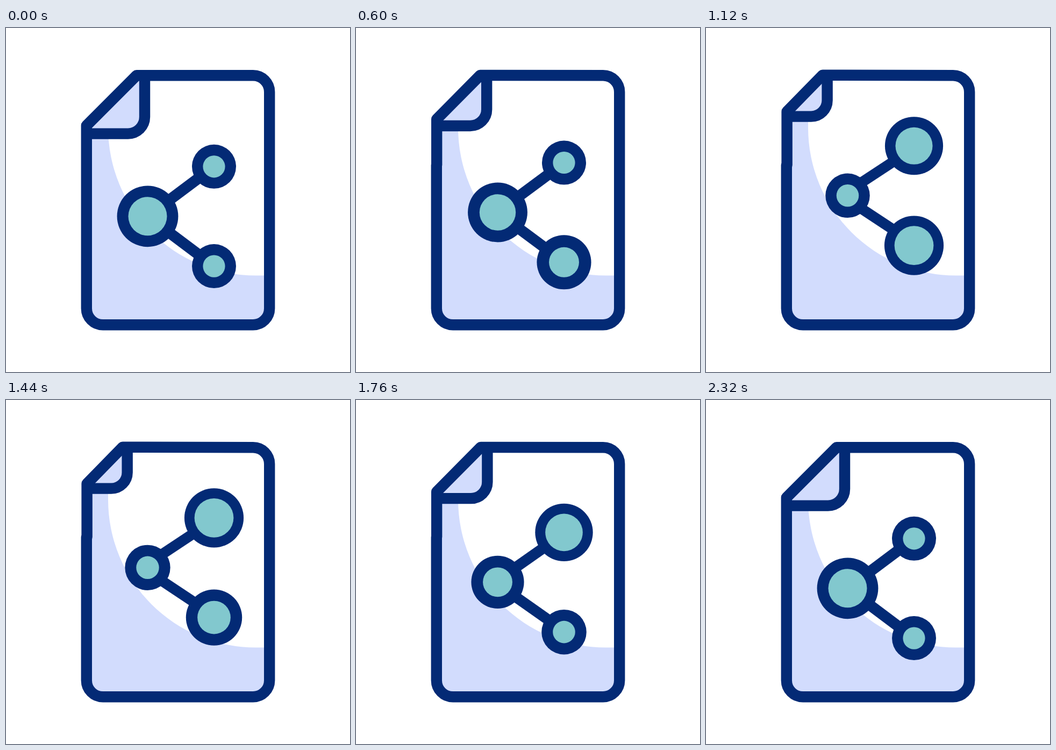
Recreate the animation shown at these times as an HTML page. Size 640x640 px, loop 2.4 s.

```html
<!DOCTYPE html>
<html lang="en">
<head>
<meta charset="utf-8">
<title>Share file icon</title>
<style>
  html, body { margin: 0; width: 100%; height: 100%; overflow: hidden; background: #fff; }
  svg { display: block; width: 100vw; height: 100vh; }
  .line { fill: none; stroke: #032a75; stroke-width: 20.4; stroke-linejoin: round; }
  .dark { fill: #032a75; }
  .teal { fill: #82c8ce; }
  .pale { fill: #d2dcfd; }
</style>
</head>
<body>
<svg viewBox="0 0 640 640">
  <path class="pale" d="M149.8 170H190V185.5A275 275 0 0 0 465 460.5H490.2V521.7A30.6 30.6 0 0 1 459.6 552.3H180.4A30.6 30.6 0 0 1 149.8 521.7Z"/>
  <path id="flap" class="pale"/>
  <path id="crease" class="line"/>
  <path id="page" class="line"/>
  <g id="share">
    <path id="links" class="line"/>
    <g id="nodes"></g>
  </g>
</svg>
<script>
const LOOP = 2400, STEP = 40;
const $ = id => document.getElementById(id);
const clamp = x => Math.min(1, Math.max(0, x));
const mix = (a, b, p) => a + (b - a) * p;
const soft = u => u * u * (3 - 2 * u);
const softer = u => u * u * u * (u * (6 * u - 15) + 10);

// Rises over [a, b] and falls back over [c, d].
function pulse(t, [a, b, c, d], ease, power = 1) {
  const up = ease(clamp((t - a) / (b - a)) ** power);
  return up - ease(clamp((t - c) / (d - c)));
}

const SMALL = [41, 20.6], BIG = [55.1, 36.4], MAIN = [56.9, 36];

const nodes = [
  { x: 263.5, y: 350.3, from: MAIN, to: SMALL,
    outer: [280, 1160, 1285, 2225], inner: [280, 1160, 1325, 2265], power: [1.65, 1.4] },
  { x: 387, y: 257.8, from: SMALL, to: BIG,
    outer: [690, 1205, 1650, 2210], inner: [715, 1230, 1650, 2210], power: [1, 1] },
  { x: 387, y: 443.1, from: SMALL, to: BIG,
    outer: [240, 820, 1275, 1840], inner: [330, 895, 1200, 1800], power: [1, 1] }
];

function circle(name, { x, y }) {
  const el = document.createElementNS("http://www.w3.org/2000/svg", "circle");
  el.setAttribute("class", name);
  el.setAttribute("cx", x);
  el.setAttribute("cy", y);
  return $("nodes").appendChild(el);
}
for (const n of nodes) {
  n.rim = circle("dark", n);
  n.core = circle("teal", n);
}

function drawPage(f) {
  const left = 149.8 + 0.8 * f, top = 88.3 - 0.6 * f;
  const tipX = 242.9 - 25.9 * f, tipY = 181.5 - 26 * f;
  const x = 258 - 32.4 * f, y = 196.6 - 32 * f, r = 31 - f;
  const curl = `V${y - r}A${r} ${r} 0 0 1 ${x - r} ${y}H${left}`;
  $("flap").setAttribute("d", `M${tipX} ${top}H${x}${curl}V${tipY}Z`);
  $("crease").setAttribute("d", `M${x} ${top}${curl}`);
  $("page").setAttribute("d",
    `M${tipX} ${top}L459.6 88.3A30.6 30.6 0 0 1 490.2 118.9V521.7` +
    `A30.6 30.6 0 0 1 459.6 552.3H180.4A30.6 30.6 0 0 1 149.8 521.7` +
    `V255H${left}V${tipY}Z`);
}

function drawShare(t) {
  const lift = -38.5 * pulse(t, [450, 920, 1445, 1960], softer);
  $("share").setAttribute("transform", `translate(0 ${lift})`);
  for (const n of nodes) {
    const outer = pulse(t, n.outer, soft, n.power[0]);
    const inner = pulse(t, n.inner, soft, n.power[1]);
    n.rim.setAttribute("r", mix(n.from[0], n.to[0], outer));
    n.core.setAttribute("r", mix(n.from[1], n.to[1], inner));
  }
  const [main, up, down] = nodes;
  const q = pulse(t, main.outer, soft, main.power[0]);
  const a = 7.5 * q, b = 4 * q;
  $("links").setAttribute("d",
    `M${main.x} ${main.y - a}L${up.x} ${up.y + b}` +
    `M${main.x} ${main.y + a}L${down.x} ${down.y - b}`);
  $("links").style.strokeWidth = 20.4 - q;
}

function draw(now) {
  const t = Math.min(2320, Math.floor((now % LOOP) / STEP) * STEP);
  drawPage(pulse(t, [280, 950, 1398, 2065], softer));
  drawShare(t);
}

let start;
function tick(now) {
  start ??= now;
  draw(now - start);
  requestAnimationFrame(tick);
}
draw(0);
requestAnimationFrame(tick);
</script>
</body>
</html>
```
